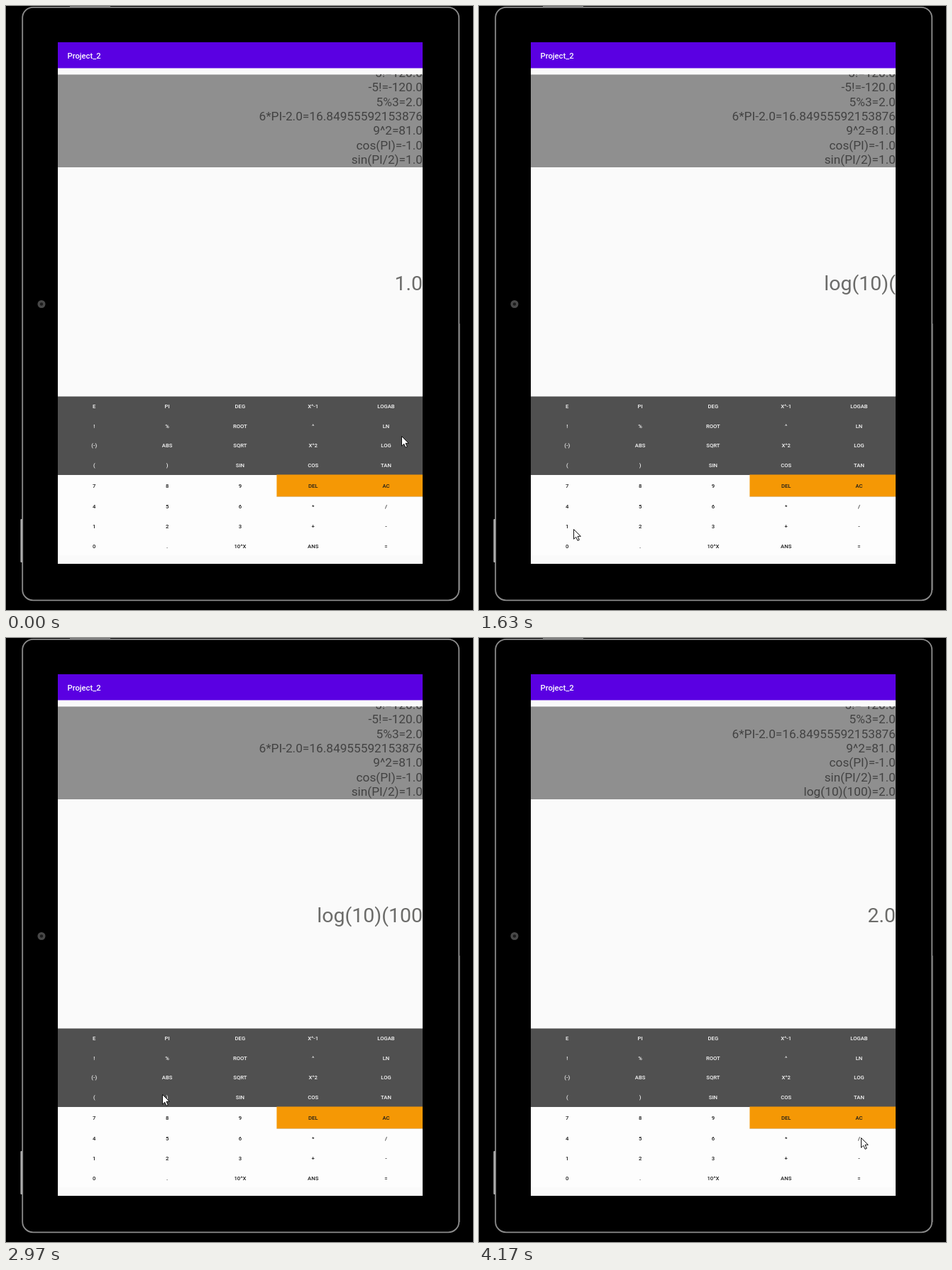
An HTML page for the animation above (4.21 s loop, 658 by 850 pixels).

```html
<!DOCTYPE html>
<html lang="en">
<head>
<meta charset="utf-8">
<title>Calculator</title>
<style>
html, body { margin: 0; width: 100%; height: 100%; overflow: hidden; background: #000; }
svg { display: block; width: 658px; height: 850px; font-family: Roboto, sans-serif; }
.mid { text-anchor: middle; font-size: 7.7px; font-weight: 500; }
.end { text-anchor: end; }
</style>
</head>
<body>
<svg viewBox="0 0 658 850" xmlns="http://www.w3.org/2000/svg">
  <defs>
    <clipPath id="logClip"><rect x="73" y="96" width="514" height="131"/></clipPath>
    <clipPath id="screenClip"><rect x="73" y="51" width="514" height="734"/></clipPath>
  </defs>
  <rect width="658" height="850" fill="#000"/>

  <!-- tablet -->
  <rect x="90" y="0" width="57" height="1" fill="#777"/>
  <rect x="20.5" y="722" width="3" height="61" rx="1" fill="#bdbdbd"/>
  <rect x="23.2" y="1.8" width="615" height="834.6" rx="15" fill="#000" stroke="#8c8c8c" stroke-width="1.8"/>
  <path d="M639 447V822" stroke="#8c8c8c" stroke-width="1"/>
  <circle cx="50" cy="419.5" r="5.5" fill="#484848"/>
  <circle cx="50" cy="419.5" r="2.2" fill="#1c1c1c"/>

  <!-- app -->
  <rect x="73" y="51" width="514" height="734" fill="#fafafa"/>
  <rect x="73" y="51" width="514" height="36.5" fill="#5a00e2"/>
  <text x="86.5" y="73.6" font-size="11.2" font-weight="500" fill="#fff">Project_2</text>
  <rect x="73" y="96.5" width="514" height="130.5" fill="#8f8f8f"/>
  <g clip-path="url(#logClip)"><g id="log" class="end" font-size="17.25" fill="#424242"></g></g>
  <g clip-path="url(#screenClip)">
    <text id="entry" class="end" x="587" y="400.3" font-size="28.5" fill="#6c6c6a"></text>
  </g>
  <rect x="73" y="549.5" width="514" height="110.5" fill="#505050"/>
  <rect x="73" y="660" width="514" height="113" fill="#fdfdfd"/>
  <rect x="381.4" y="690" width="205.6" height="1" fill="#d5cec2"/>
  <rect x="381.4" y="659.5" width="205.6" height="30.8" fill="#f59805"/>
  <g id="keys" class="mid"></g>

  <path id="cursor" d="M.5 .5V14.2L3.7 11.2L6 16.3L8.3 15.3L6 10.3H10.3Z"
        fill="#fff" stroke="#111" stroke-width="1" stroke-linejoin="round"/>
</svg>
<script>
const LOOP = 4210, LINE = 20.34, SCROLL_AT = 3930, SCROLL_MS = 240;
const $ = id => document.getElementById(id);

function addText(parent, x, y, str, fill) {
  const t = document.createElementNS('http://www.w3.org/2000/svg', 'text');
  t.setAttribute('x', x);
  t.setAttribute('y', y);
  if (fill) t.setAttribute('fill', fill);
  t.textContent = str;
  parent.appendChild(t);
  return t;
}

// keypad
const rows = [
  [563.5, 'E PI DEG X^-1 LOGAB'],
  [591, '! % ROOT ^ LN'],
  [618.5, '(-) ABS SQRT X^2 LOG'],
  [646, '( ) SIN COS TAN'],
  [675.3, '7 8 9 DEL AC'],
  [704.5, '4 5 6 * /'],
  [732.3, '1 2 3 + -'],
  [760, '0 . 10^X ANS =']
];
rows.forEach(([y, labels], r) => labels.split(' ').forEach((label, c) =>
  addText($('keys'), 124.3 + 102.8 * c, y + 2.8, label, r < 4 ? '#f6f6f6' : '#1c1c1c')));

// history
const history = ['5!=120.0', '-5!=-120.0', '5%3=2.0', '6*PI-2.0=16.84955592153876',
  '9^2=81.0', 'cos(PI)=-1.0', 'sin(PI/2)=1.0', 'log(10)(100)=2.0'];
const logLines = history.map((s, i) => addText($('log'), 587, 100 + LINE * i, s));
const newest = logLines[logLines.length - 1];

// entry line: [time, text]
const entries = [[0, '1.0'], [750, 'log(10)('], [1690, 'log(10)(1'], [1970, 'log(10)(10'],
  [2150, 'log(10)(100'], [3000, 'log(10)(100)'], [SCROLL_AT, '2.0']];

// pointer: [time, x, y]
const path = [
  [0, 557, 605], [250, 547, 611], [500, 541, 614], [740, 541, 614],
  [930, 380, 662], [1090, 190, 702], [1230, 98, 717], [1400, 112, 730],
  [1630, 133, 736], [1750, 133, 738], [1920, 129, 764], [2180, 130, 764],
  [2310, 165, 747], [2470, 377, 662], [2540, 380, 645], [2680, 300, 620],
  [2840, 220, 641], [3060, 220, 643], [3220, 345, 672], [3370, 489, 722],
  [3430, 511, 733], [3600, 535, 753], [3750, 538, 757], [3930, 538, 757],
  [4030, 542, 743], [4170, 538, 703], [4210, 537, 694]
];

const slope = (i, k) => (path[i + 1][k] - path[i][k]) / (path[i + 1][0] - path[i][0]);

// harmonic mean keeps each curve free of overshoot
function tangent(i, k) {
  if (i === 0) return slope(0, k);
  if (i === path.length - 1) return slope(i - 1, k);
  const a = slope(i - 1, k), b = slope(i, k);
  return a * b <= 0 ? 0 : 2 * a * b / (a + b);
}

function pointer(t, k) {
  let i = 0;
  while (i < path.length - 2 && t >= path[i + 1][0]) i++;
  const h = path[i + 1][0] - path[i][0], u = (t - path[i][0]) / h;
  const v = 1 - u;
  return path[i][k] * (1 + 2 * u) * v * v + h * tangent(i, k) * u * v * v
    + path[i + 1][k] * u * u * (3 - 2 * u) - h * tangent(i + 1, k) * u * u * v;
}

function draw(t) {
  let text = '';
  for (const [at, s] of entries) if (t >= at) text = s;
  if ($('entry').textContent !== text) $('entry').textContent = text;

  const p = Math.min(1, Math.max(0, (t - SCROLL_AT) / SCROLL_MS));
  const shift = LINE * (1 - (1 - p) ** 2);
  $('log').setAttribute('transform', `translate(0 ${-shift})`);
  newest.setAttribute('visibility', t >= SCROLL_AT ? 'visible' : 'hidden');

  $('cursor').setAttribute('transform',
    `translate(${Math.round(pointer(t, 1))} ${Math.round(pointer(t, 2))})`);
}

const start = performance.now();
function tick() {
  draw((performance.now() - start) % LOOP);
  requestAnimationFrame(tick);
}
draw(0);
requestAnimationFrame(tick);
</script>
</body>
</html>
```
